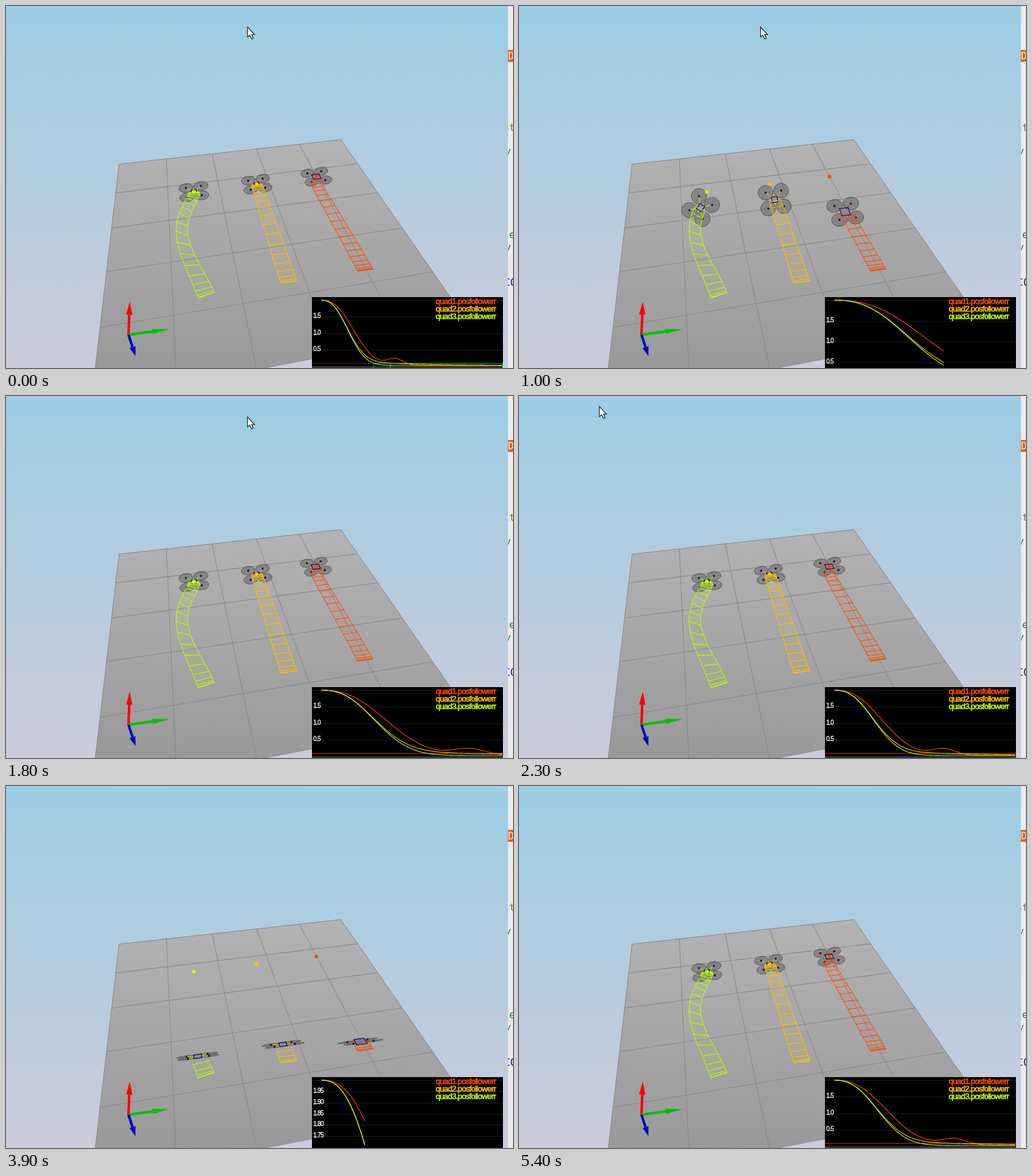
Recreate the animation shown at these times as an HTML page with a canvas. Size 807 px wide and 577 px high, loop 5500 ms.

```html
<!DOCTYPE html>
<html>
<head>
<meta charset="utf-8">
<style>
html, body { margin: 0; overflow: hidden; }
canvas { display: block; }
</style>
</head>
<body>
<canvas id="stage" width="807" height="577"></canvas>
<script>
const c = document.getElementById('stage').getContext('2d');
const LOOP = 5500, FRAME = 100, PX_PER_STEP = 28.57, LIMIT = .1, HOLD = 17.4;

const bell = (x, mid, width) => Math.exp(-(((x - mid) / width) ** 2));
const mix = (a, b, t) => a + (b - a) * t;

// tau: response time, bend: perspective speed-up, sway: sideways [size, middle, width],
// climb: step of the steepest pitch, yaw: peak turn, tail and ripple: late error
const quads = [
  { name: 'quad1.posfollowerr', color: '#ff4800', start: [572, 421], goal: [494, 272], tau: 6.17, bend: 0,
    sway: [-6, 8.5, 4], climb: 7.8, yaw: 0, shear: 3.5, body: .52, tail: 0, ripple: .2 },
  { name: 'quad2.posfollowerr', color: '#ffc000', start: [450, 440], goal: [399, 284], tau: 5.1, bend: .3,
    sway: [0, 1, 1], climb: 6.1, yaw: 0, shear: 2, body: .36, tail: .26, ripple: 0 },
  { name: 'quad3.posfollowerr', color: '#c0ff00', start: [319, 461], goal: [299, 296], tau: 5.07, bend: .3,
    sway: [-27, 4.4, 2], climb: 6.1, yaw: .72, shear: .7, body: .36, tail: 0, ripple: 0 }
];

const remaining = (quad, step) => Math.exp(-((step / quad.tau) ** 2.5));

function error(quad, step) {
  const left = remaining(quad, step);
  return 2 * left + (1 - left) ** 3 * (.03 + quad.tail * Math.exp(-step / 8))
    + quad.ripple * bell(step, 11.5, 1.8);
}

for (const quad of quads) {
  quad.settle = 30;
  while (error(quad, quad.settle) < LIMIT) quad.settle -= .1;
}

function poly(points, fill, stroke, width = 1) {
  c.beginPath();
  points.forEach(p => c.lineTo(...p));
  if (fill) { c.closePath(); c.fillStyle = fill; c.fill(); }
  if (stroke) { c.strokeStyle = stroke; c.lineWidth = width; c.stroke(); }
}

function text(str, x, y, color, font, weight = 0) {
  c.font = font;
  c.fillStyle = c.strokeStyle = color;
  c.lineWidth = weight;
  c.fillText(str, x, y);
  if (weight) c.strokeText(str, x, y);
}

function gradient(y0, y1, from, to) {
  const g = c.createLinearGradient(0, y0, 0, y1);
  g.addColorStop(0, from);
  g.addColorStop(1, to);
  return g;
}

// Perspective view of the unit square
function floorAt(u, v) {
  const w = 1 + .085 * u - .4465 * v;
  return [(180 + 398.3 * u - 104.8 * v) / w, (252 - 20.9 * u + 96.7 * v) / w];
}

function arrow(x1, y1, width, headLength, color) {
  const x = 195, y = 524, len = Math.hypot(x1 - x, y1 - y), neck = len - headLength;
  const ux = (x1 - x) / len, uy = (y1 - y) / len;
  const at = (along, side) => [x + ux * along - uy * side, y + uy * along + ux * side];
  poly([at(0, -2), at(neck, -2), at(neck, 2), at(0, 2)], color);
  poly([at(neck, -width), at(len, 0), at(neck, width)], color);
}

function drawScene() {
  c.fillStyle = gradient(0, 577, '#9bcde5', '#cccbda');
  c.fillRect(0, 0, 807, 577);
  poly([floorAt(0, 0), floorAt(1, 0), floorAt(1, 1), floorAt(0, 1)], gradient(213, 577, '#b3b3b3', '#999'));
  for (let i = 0; i <= 1.01; i += .2) {
    poly([floorAt(i, 0), floorAt(i, 1)], null, '#888');
    poly([floorAt(0, i), floorAt(1, i)], null, '#888');
  }
  arrow(197, 471, 5, 21, '#f00');
  arrow(260, 515, 4, 27, '#00c000');
  arrow(206, 558, 5, 15, '#0000c0');
}

function drawEditor() {
  c.save();
  c.beginPath();
  c.rect(799, 0, 8, 577);
  c.clip();
  c.fillStyle = '#ebebeb';
  c.fillRect(799, 0, 8, 577);
  c.fillStyle = '#d9622b';
  c.fillRect(799, 70, 8, 19);
  const font = '16px "DejaVu Sans Mono", monospace';
  text('D', 799, 85, '#fff0c0', font);
  text('nt', 791, 199, '#777720', font);
  text('w', 793, 237, '#208020', 'italic ' + font);
  text('le', 791, 370, '#208020', font);
  text('w', 793, 390, '#208020', 'italic ' + font);
  text('CO', 793, 446, '#101090', font);
  c.restore();
}

// Pose at a step, with a function that maps airframe axes to the stage
function pose(quad, step) {
  const done = 1 - remaining(quad, step), p = done * (1 + quad.bend * (1 - done));
  const [size, mid, width] = quad.sway;
  const x = mix(quad.start[0], quad.goal[0], p) + size * bell(step, mid, width);
  const y = mix(quad.start[1], quad.goal[1], p);
  const open = Math.min(1, .62 - .55 * bell(step, 2.4, 1.1) + .38 * bell(step, quad.climb, 2.2));
  const yaw = quad.yaw * (bell(step, 5.7, 2.5) - .35 * bell(step, 0, 3));
  const scale = 1 + (y - 285) / 315, cos = Math.cos(yaw), sin = Math.sin(yaw);
  const at = (a, b, k = open) => {
    const side = (a * cos - b * sin) * scale, depth = (a * sin + b * cos) * scale;
    return [x + side * 11.5 + depth * quad.shear, y - side * 1.6 + depth * 11.7 * k];
  };
  return { x, y, open, scale, at };
}

function drawTrail(quad, step) {
  const left = [], right = [];
  for (let s = 0; s <= Math.min(step, 9.5); s += .5) {
    const { at } = pose(quad, s);
    left.push(at(-.75, 0, .8));
    right.push(at(.75, 0, .8));
  }
  c.globalAlpha = .08;
  poly([...left, ...right.slice().reverse()], quad.color);
  c.globalAlpha = 1;
  poly(left, null, quad.color);
  poly(right, null, quad.color);
  left.forEach((p, i) => poly([p, right[i]], null, quad.color));
}

function drawQuad(quad, step) {
  const { x, y, open, scale, at } = pose(quad, step);
  const corners = [[-1, -1], [1, -1], [1, 1], [-1, 1]];
  const hubs = corners.map(([a, b]) => at(a, b));
  hubs.forEach(([hx, hy]) => {
    c.beginPath();
    c.ellipse(hx, hy, 11 * scale, 11 * scale * open, -.14, 0, 7);
    c.fillStyle = 'rgba(75,75,75,.4)';
    c.fill();
    c.strokeStyle = '#5a5a5a';
    c.lineWidth = 1;
    c.stroke();
  });
  c.globalAlpha = .6;
  hubs.forEach(h => poly([[x, y], h], null, quad.color, 1.5));
  c.globalAlpha = 1;
  c.fillStyle = '#101050';
  hubs.forEach(([hx, hy]) => c.fillRect(hx - 1.5, hy - 1.5, 3, 3));
  poly([...corners, corners[0]].map(([a, b]) => at(a * quad.body, b * quad.body, Math.max(open, .5))),
    'rgba(125,125,205,.6)', '#18183a', 1.3);
}

function drawGoal({ goal, color }) {
  c.beginPath();
  c.arc(...goal, 3, 0, 7);
  c.fillStyle = color;
  c.fill();
}

function drawChart(step) {
  const left = 502, top = 469, sans = '"Liberation Sans", sans-serif';
  const pitch = PX_PER_STEP * Math.min(1, 289 / (step * PX_PER_STEP + .01));
  const low = Math.min(1.98, ...quads.map(q => error(q, step)));
  const yOf = e => top + (2 - e) * 104 / (2 - low);
  c.save();
  c.beginPath();
  c.rect(487, 464, 304, 113);
  c.clip();
  c.fillStyle = '#000';
  c.fillRect(487, 464, 304, 113);
  c.letterSpacing = '-0.8px';

  const tick = [.01, .02, .05, .1, .2, .5].find(s => s >= (2 - low) / 6.5);
  for (let e = 2; yOf(e) < 577; e -= tick) {
    const y = Math.round(yOf(e)) + .5;
    poly([[487, y], [791, y]], null, e < .01 ? '#777' : '#1c1c1c');
    if (e < 2 && y < 572) text(e.toFixed(tick < .1 ? 2 : 1), 489, y + 1, '#fff', '10px ' + sans, .3);
  }

  const limit = Math.round(yOf(LIMIT)) + .5;
  const settled = quads.filter(q => step > q.settle + HOLD);
  poly([[487, limit], [791, limit]], null, settled.length ? '#592626' : '#b03030');
  settled.forEach(q => {
    const x = Math.round(left + q.settle * pitch) + .5;
    poly([[x, 577], [x, limit], [790.5, limit], [790.5, 577]], null, '#00c020');
  });

  quads.forEach((q, i) => {
    const line = [];
    for (let x = 0; x <= step * pitch; x++) line.push([left + x, yOf(error(q, x / pitch))]);
    poly(line, null, q.color, 1.1);
    text(q.name, 684, 475 + i * 12, q.color, '13px ' + sans, .6);
  });
  c.restore();
}

function drawCursor(t) {
  if (t >= 2900) return;
  const p = Math.min(1, Math.max(0, (t - 1800) / 600)), ease = p * p * (3 - 2 * p);
  const x = mix(384.5, 107.5, ease), y = mix(33.5, 15.5, ease);
  poly([[0, 0], [0, 16], [3.5, 13], [6.5, 19], [9, 18], [6.5, 12], [11, 12], [0, 0]]
    .map(([dx, dy]) => [x + dx, y + dy]), '#fff', '#222', 1.2);
}

// The flight restarts twice per loop and pauses once
function stepAt(t) {
  if (t < 388) return (t - 388) / 100 + 32.2;
  if (t >= 3658) return (t - 3658) / 100;
  if (t >= 2900) return (t - 478) / 100;
  return (Math.min(t, 2400) - 388) / 100;
}

function draw() {
  const t = Math.floor(performance.now() % LOOP / FRAME) * FRAME, step = stepAt(t);
  drawScene();
  quads.forEach(q => drawQuad(q, step));
  quads.forEach(q => drawTrail(q, step));
  quads.forEach(drawGoal);
  drawChart(step);
  drawEditor();
  drawCursor(t);
  requestAnimationFrame(draw);
}
draw();
</script>
</body>
</html>
```
